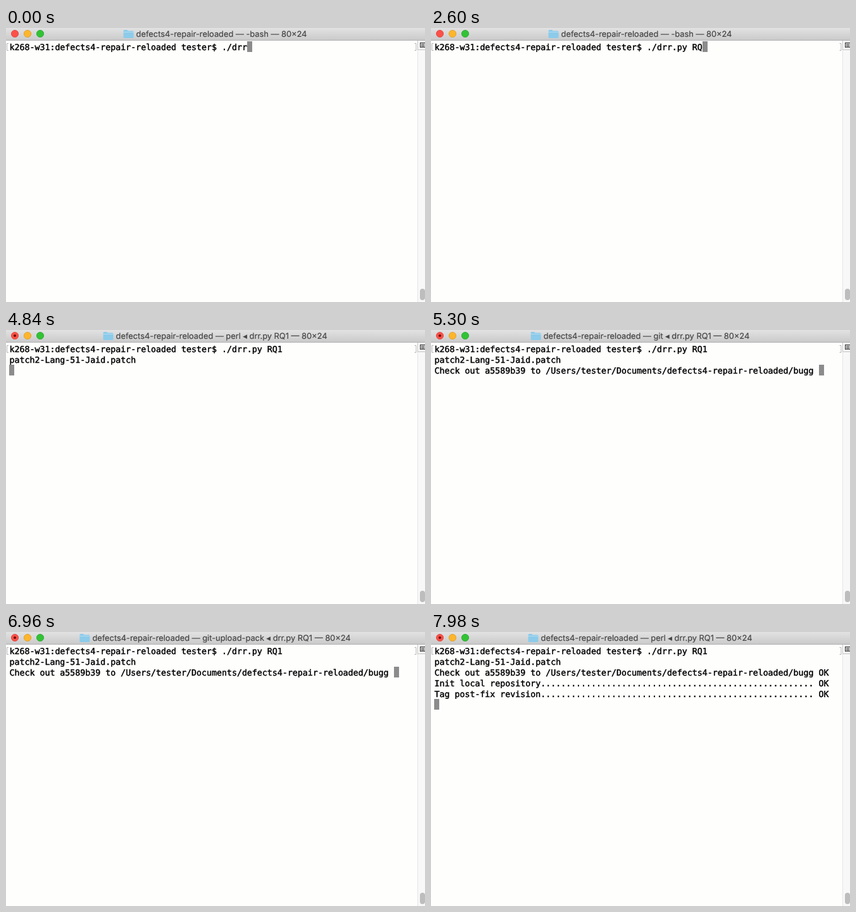
These frames come from a looping animation (662x434 px, 8000 ms). An HTML page:

```html
<!DOCTYPE html>
<html lang="en">
<head>
<meta charset="utf-8">
<title>Terminal session</title>
<style>
  html, body { margin: 0; width: 100%; height: 100%; overflow: hidden; background: #fefefd; }
  svg { display: block; width: 662px; height: 434px; }
  text { white-space: pre; text-rendering: geometricPrecision; }
  #title { font: 12.85px Inter, "DejaVu Sans", sans-serif; fill: #464646; text-anchor: middle;
           stroke: #464646; stroke-width: .2px; }
  #screen { font: 13.288px "DejaVu Sans Mono", monospace; fill: #000; stroke: #000; stroke-width: .45px; }
</style>
</head>
<body>
<svg viewBox="0 0 662 434">
  <defs>
    <linearGradient id="bar" x2="0" y2="1">
      <stop offset="0" stop-color="#e2e2e3"/>
      <stop offset="1" stop-color="#c9c9ca"/>
    </linearGradient>
  </defs>
  <rect width="662" height="434" fill="#fefefd"/>

  <!-- scroll bar and split button -->
  <rect x="650" y="20" width="12" height="414" fill="#f8f8f8"/>
  <path d="M650.5 20V434" stroke="#e4e4e6"/>
  <rect x="654" y="413" width="8" height="18" rx="4" fill="#bdbdbd"/>
  <path d="M650.5 20V34.5H662" fill="none" stroke="#c4c4c6"/>
  <rect x="654.5" y="23.5" width="8" height="7" fill="#d4d4d4" stroke="#333"/>
  <path d="M656 26H661M656 28.5H661" stroke="#333"/>

  <!-- title bar -->
  <rect width="662" height="20" fill="url(#bar)"/>
  <path d="M0 19.5H662" stroke="#b0b0b2"/>
  <circle cx="14" cy="9" r="5.6" fill="#fc5048" stroke="#dc4038" stroke-width=".8"/>
  <circle cx="34" cy="9" r="5.6" fill="#fdb62c" stroke="#dc9a20" stroke-width=".8"/>
  <circle cx="54" cy="9" r="5.6" fill="#32c334" stroke="#25a32c" stroke-width=".8"/>
  <circle id="busy" cx="14" cy="9" r="2.1" fill="#6a0c04"/>
  <g id="folder" fill="#8ccbea">
    <path d="M0 4.5Q0 3 1.5 3H5.5L7 4.5H14.5Q16 4.5 16 6V14.5Q16 16 14.5 16H1.5Q0 16 0 14.5Z"/>
    <path d="M0 6.5H16" stroke="#fff" stroke-opacity=".35"/>
  </g>
  <text id="title" x="340.5" y="14"></text>

  <!-- prompt marks -->
  <path d="M4 24.5H1.5V35.5H4M645.5 24.5H648V35.5H645.5" fill="none" stroke="#b4b4b4"/>
  <rect id="cursor" width="8" height="17" fill="#8c8c8c"/>
  <g id="screen"></g>
</svg>
<script>
const LOOP = 8000, LEFT = 5, CELL = 8, ROW = 17;
const PROJECT = 'defects4-repair-reloaded';
const $ = id => document.getElementById(id);
const dotted = label => label.padEnd(75, '.') + ' ';

// [time in ms, text written to the terminal]
const output = [
  [0, `k268-w31:${PROJECT} tester$ ./drr`],
  [140, '.'], [360, 'p'], [540, 'y'], [900, ' '],
  [2000, 'R'], [2300, 'Q'], [2760, '1'],
  [4400, '\n'],
  [4680, 'patch2-Lang-51-Jaid.patch\n'],
  [4860, `Check out a5589b39 to /Users/tester/Documents/${PROJECT}/bugg `],
  [7640, 'OK\n' + dotted('Init local repository')],
  [7760, 'OK\n' + dotted('Tag post-fix revision')],
  [7880, 'OK\n']
];

// [time in ms, foreground process]
const processes = [
  [0, '-bash'],
  [4420, 'Python ◂ drr.py RQ1'],
  [4700, 'perl ◂ drr.py RQ1'],
  [4960, 'git ◂ drr.py RQ1'],
  [5960, 'git-upload-pack ◂ drr.py RQ1'],
  [7000, 'git ◂ drr.py RQ1'],
  [7660, 'perl ◂ drr.py RQ1']
];

const rows = Array.from({ length: 6 }, (_, i) => {
  const row = document.createElementNS('http://www.w3.org/2000/svg', 'text');
  row.setAttribute('x', LEFT + .5);
  row.setAttribute('y', 35 + i * ROW);
  return $('screen').appendChild(row);
});

const until = (events, t) => events.filter(([start]) => start <= t).map(([, value]) => value);

function render(t) {
  const lines = until(output, t).join('').split('\n');
  rows.forEach((row, i) => row.textContent = lines[i] || '');
  const last = lines.length - 1;
  $('cursor').setAttribute('x', LEFT + lines[last].length * CELL);
  $('cursor').setAttribute('y', 21 + last * ROW);

  const process = until(processes, t).pop();
  $('title').textContent = `${PROJECT} — ${process} — 80×24`;
  const titleLeft = 340.5 - $('title').getComputedTextLength() / 2;
  $('folder').setAttribute('transform', `translate(${titleLeft - 20} 0)`);
  $('busy').setAttribute('visibility', process === '-bash' ? 'hidden' : 'visible');
}

const begin = performance.now();
function frame() {
  render((performance.now() - begin) % LOOP);
  requestAnimationFrame(frame);
}
frame();
</script>
</body>
</html>
```
